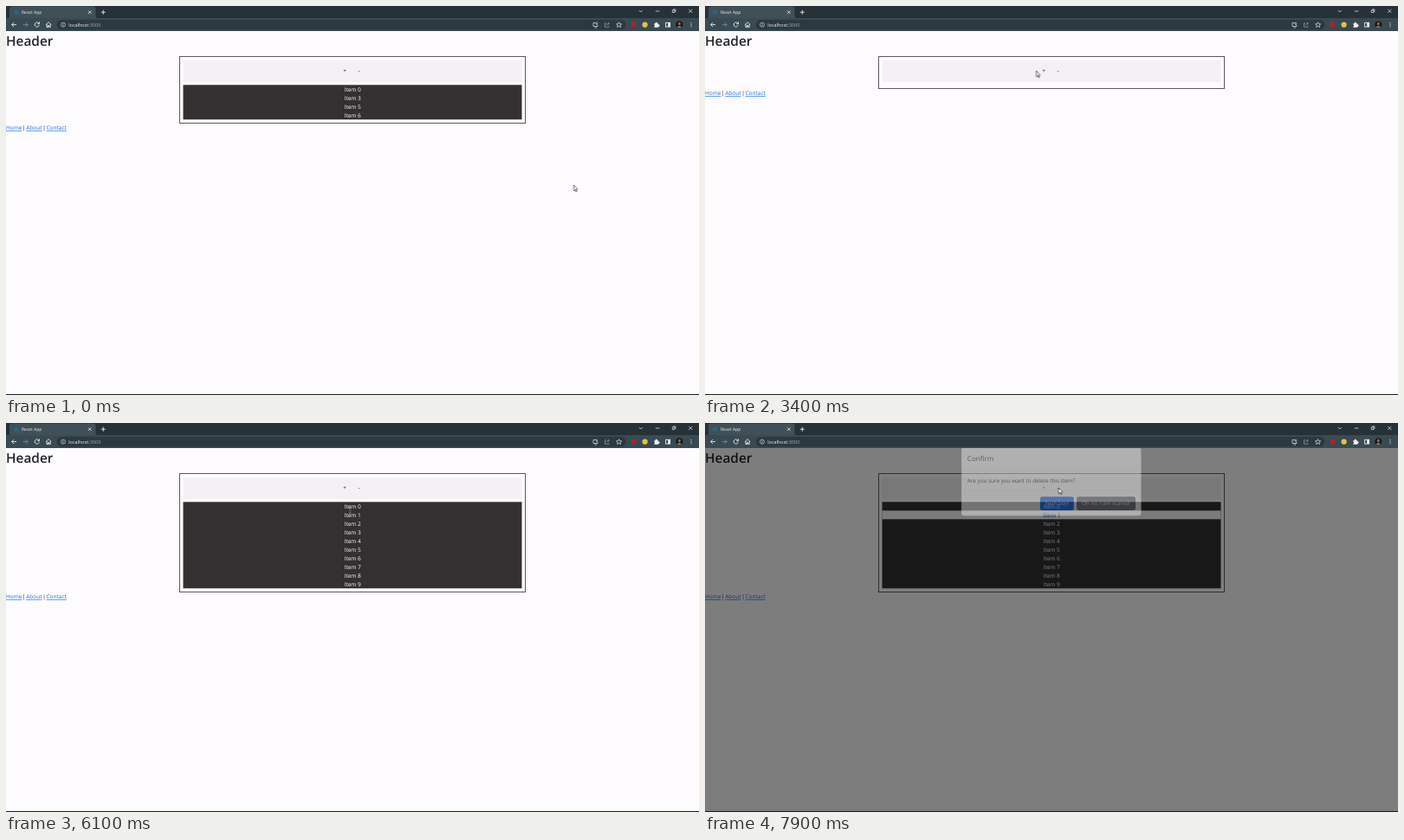
Recreate the animation shown at these times as an HTML page. Size 800 px wide and 450 px high, loop 8 s.

```html
<!DOCTYPE html>
<html lang="en">
<head>
<meta charset="utf-8">
<title>React App</title>
<style>
  html, body { margin: 0; width: 100%; height: 100%; overflow: hidden; background: #fefcfe; }
  svg { display: block; width: 800px; height: 450px; }
  text { font-family: "Open Sans", "Noto Sans", sans-serif; font-size: 6.5px; text-rendering: geometricPrecision; white-space: pre; }
  .mid { text-anchor: middle; }
  .line { fill: none; stroke: #e8eaed; stroke-width: .9; }
  .item { fill: #fff; font-weight: 500; }
  .picked { fill: #f8f4f8; }
  .picked + .item { fill: #2f6fd0; font-weight: 700; }
  .link { fill: #1a6fe8; text-decoration: underline; text-decoration-thickness: .5px; }
  .press { fill: #f3f1f4; stroke: #555; stroke-width: .7; visibility: hidden; }
  .on { visibility: visible; }

  #cursor, #arrow, #hand, #beam, #shade, #modal { animation: 8s linear infinite; }
  #cursor { animation-name: roam; animation-timing-function: ease-in-out; }
  #arrow { animation-name: arrow; }
  #hand { animation-name: hand; }
  #beam { animation-name: beam; }
  #arrow, #hand, #beam { animation-timing-function: step-end; }
  #shade { animation-name: shade; }
  #modal { animation-name: drop; }

  @keyframes roam {
    0%, 8% { transform: translate(655.5px, 207px); }
    18.9%, 21.5% { transform: translate(37px, 24.5px); }
    41.8%, 42.5% { transform: translate(382.5px, 75px); }
    46.25%, 71.5% { transform: translate(390.5px, 73.3px); }
    76.25% { transform: translate(397.3px, 100.5px); }
    78.75%, 80.5% { transform: translate(401.8px, 107.6px); }
    82.5%, 85% { transform: translate(402.6px, 108.6px); }
    90%, 100% { transform: translate(408.3px, 75px); }
  }
  @keyframes arrow {
    0% { visibility: visible; }
    45% { visibility: hidden; }
    73.2% { visibility: visible; }
    75.5% { visibility: hidden; }
    86.2% { visibility: visible; }
    89% { visibility: hidden; }
    96.1%, 100% { visibility: visible; }
  }
  @keyframes hand {
    0% { visibility: hidden; }
    45% { visibility: visible; }
    73.2% { visibility: hidden; }
    89% { visibility: visible; }
    96.1%, 100% { visibility: hidden; }
  }
  @keyframes beam {
    0% { visibility: hidden; }
    75.5% { visibility: visible; }
    86.2%, 100% { visibility: hidden; }
  }
  @keyframes shade {
    0%, 96.05% { opacity: 0; }
    97.92%, 100% { opacity: .5; }
  }
  @keyframes drop {
    0% { opacity: 0; transform: translate(296px, 20px); }
    97.92% { opacity: 0; transform: translate(296px, 20px); animation-timing-function: cubic-bezier(.2, .3, .6, .9); }
    100% { opacity: .72; transform: translate(296px, 35px); }
  }
</style>
</head>
<body>
<svg viewBox="0 0 800 450">
  <rect width="800" height="450" fill="#fefcfe"/>

  <!-- page -->
  <text y="46.2" style="font-size:15.4px;font-weight:600" fill="#212529">Header</text>
  <rect id="frame" x="200.5" y="58.5" width="399" height="77" fill="none" stroke="#5c5a5e"/>
  <rect x="204.5" y="63" width="391" height="25" fill="#f3f1f4"/>
  <rect class="press" id="add" x="383.4" y="67.2" width="15.4" height="15.2" rx="2.2"/>
  <rect class="press" id="del" x="400" y="67.2" width="15.4" height="15.2" rx="2.2"/>
  <g class="mid" fill="#222">
    <text x="391.1" y="77.2">+</text>
    <text x="407.6" y="77.2">-</text>
  </g>
  <rect id="back" x="204.5" y="91.3" width="391" height="40" fill="#323031"/>
  <g id="list"></g>
  <g id="links" fill="#212529">
    <text class="link">Home</text>
    <text x="18.8">|</text>
    <text class="link" x="23.2">About</text>
    <text x="42.2">|</text>
    <text class="link" x="46.5">Contact</text>
  </g>
  <rect id="shade" y="29" width="800" height="420" fill="#000"/>
  <g id="modal">
    <rect width="207.6" height="79" rx="3" fill="#fff" stroke="#999" stroke-width=".4"/>
    <path d="M0 26.5H207.6M0 50H207.6" stroke="#dee2e6" stroke-width=".5"/>
    <text x="6.8" y="16.2" style="font-size:8.1px;font-weight:500" fill="#212529">Confirm</text>
    <text x="6.8" y="40.8" style="font-size:6.35px" fill="#212529">Are you sure you want to delete this item?</text>
    <rect x="90.8" y="57" width="39" height="15.8" rx="2.5" fill="#0d6efd"/>
    <rect x="133" y="57" width="68" height="15.8" rx="2.5" fill="#6c757d"/>
    <g class="mid" fill="#fff">
      <text x="110.3" y="67.2" style="font-size:6.2px">Yeah boy!</text>
      <text x="167" y="67.2" style="font-size:6.2px">Oh no, I am scared!</text>
    </g>
  </g>
  <rect y="449" width="800" height="1" fill="#1d1d1f"/>

  <!-- browser -->
  <rect width="800" height="14.5" fill="#263238"/>
  <path d="M1 14.5Q4 14.5 4 11.5V3.5Q4 .5 7 .5H100.5Q103.5 .5 103.5 3.5V11.5Q103.5 14.5 106.5 14.5Z" fill="#3f5058"/>
  <rect y="14" width="800" height="15" fill="#3a4a52"/>
  <rect x="58.5" y="16" width="657" height="11.4" rx="5.7" fill="#2c3940"/>
  <circle cx="11.6" cy="7.2" r="2.7" fill="#2a6480"/>
  <g fill="#f1f3f4" font-weight="500">
    <text x="18" y="9" style="font-size:5px">React App</text>
    <text x="72.2" y="23.7" style="font-size:5.5px">localhost:<tspan fill="#a5adb1">3000</tspan></text>
  </g>
  <g class="line">
    <path d="M95 5.5l3.4 3.4m0-3.4l-3.4 3.4M109.8 7.2h5m-2.5-2.5v5"/>
    <path d="M12 21.6H6.6m2.5-2.5l-2.5 2.5 2.5 2.5"/>
    <path stroke="#7f8b91" d="M19.8 21.6h5.4m-2.5-2.5l2.5 2.5-2.5 2.5"/>
    <path d="M37.7 19.7A2.6 2.6 0 1 0 38.3 22.3M38.5 18.4v2.3h-2.3"/>
    <path d="M46 21.7l3.1-3 3.1 3M47 21v3.5h1.5v-2h1.2v2h1.5V21"/>
    <circle cx="66" cy="21.7" r="2.5" stroke-width=".6"/>
    <path stroke-width=".7" d="M66 21.3v1.8M66 20v.6"/>
    <path stroke-width=".7" d="M681 19.5h-3v4h5v-1.5M679.5 25h2.5M682 18.5v3m-1.3-1.2l1.3 1.2 1.3-1.2"/>
    <path stroke-width=".7" stroke="#9aa3a8" d="M693 19.7h-1.5v4.6h4.6v-1.2M693 22.5q.4-2.3 3.2-2.3m-1.3-1.4l1.5 1.4-1.5 1.4"/>
    <path stroke-width=".7" d="M707.6 18.7l.9 2 2.2.2-1.7 1.4.5 2.2-1.9-1.2-1.9 1.2.5-2.2-1.7-1.4 2.2-.2z"/>
    <path stroke-width=".7" d="M730.8 5l2 2 2-2M749.8 6h4.6M769.3 4.9h2.6v2.6h-2.6zM770.3 4.8v-.9h2.6v2.6h-.9M788.2 3.8l4.2 4.2m0-4.2l-4.2 4.2"/>
    <rect x="761.6" y="19.3" width="5" height="4.8"/>
  </g>
  <rect x="721.8" y="19" width="5.2" height="5.2" fill="#b3202a"/>
  <circle cx="737.6" cy="21.7" r="3.1" fill="#e6bf45"/>
  <path fill="#f1f3f4" d="M748.3 20.2h1.4a1.1 1.1 0 1 1 2.1 0h1.4v1.4a1.1 1.1 0 1 1 0 2.1v1h-4.9v-1a1.1 1.1 0 0 0 0-2.1zM764.2 19.3h2.4v4.8h-2.4z"/>
  <circle cx="777.3" cy="21.6" r="4" fill="#17191b"/>
  <path fill="#8f6a5a" d="M777.3 18.8a1.5 1.7 0 1 1 0 3.4 1.5 1.7 0 1 1 0-3.4M774.6 24.5q2.7-3.4 5.4 0-2.7 2.2-5.4 0"/>
  <g fill="#e8eaed">
    <circle cx="791" cy="19.6" r=".6"/>
    <circle cx="791" cy="21.7" r=".6"/>
    <circle cx="791" cy="23.8" r=".6"/>
  </g>

  <g id="cursor" stroke="#111" stroke-width=".6" fill="#fff" stroke-linejoin="round">
    <path id="arrow" d="M0 0V6.8L1.5 5.5 2.5 7.9 3.5 7.5 2.5 5.1H4.5Z"/>
    <path id="hand" d="M-.8.9A.8.8 0 0 1 .8.9V3.6L3.3 4.1Q4.1 4.4 3.9 5.5L3.4 8.6H-.8L-2.8 5.7Q-2.9 4.7-1.9 4.8L-.8 5.7Z"/>
    <path id="beam" d="M-1.5-4H1.5M0-4V4M-1.5 4H1.5" fill="none" stroke="#a5a3a4"/>
  </g>
</svg>
<script>
  const LOOP = 8000, RELOAD = 1800, FIRST = 4000, GAP = 190, MAX = 10, HOLD = 90, PICK = 6820;
  const ROW = 10, TOP = 91.3;
  const $ = id => document.getElementById(id);
  const start = performance.now();
  let shown = '';

  function itemsAt(t) {
    if (t < RELOAD) return [0, 3, 5, 6];
    const count = Math.floor((t - FIRST) / GAP) + 1;
    return Array.from({ length: Math.max(0, Math.min(MAX, count)) }, (_, i) => i);
  }

  function drawList(items, picked) {
    const key = items.join() + picked;
    if (key === shown) return;
    shown = key;
    const grow = items.length * ROW;
    $('list').innerHTML = items.map((n, i) => {
      const y = TOP + i * ROW;
      const mark = n === picked ? `<rect class="picked" x="204.5" y="${y}" width="391" height="${ROW}"/>` : '';
      return `${mark}<text class="item mid" x="400.2" y="${y + 7.6}">Item ${n}</text>`;
    }).join('');
    $('back').setAttribute('height', grow);
    $('frame').setAttribute('height', 37 + grow);
    $('links').setAttribute('transform', `translate(0 ${103.3 + grow})`);
  }

  // The add button is held down just before each click lands.
  function isAdding(t) {
    const since = t - FIRST + HOLD;
    return since >= 0 && since < GAP * MAX && since % GAP < HOLD;
  }

  function draw() {
    const t = (performance.now() - start) % LOOP;
    drawList(itemsAt(t), t >= PICK ? 1 : -1);
    $('add').classList.toggle('on', isAdding(t));
    $('del').classList.toggle('on', t >= 7520 && t < 7640);
    requestAnimationFrame(draw);
  }
  draw();
</script>
</body>
</html>
```
